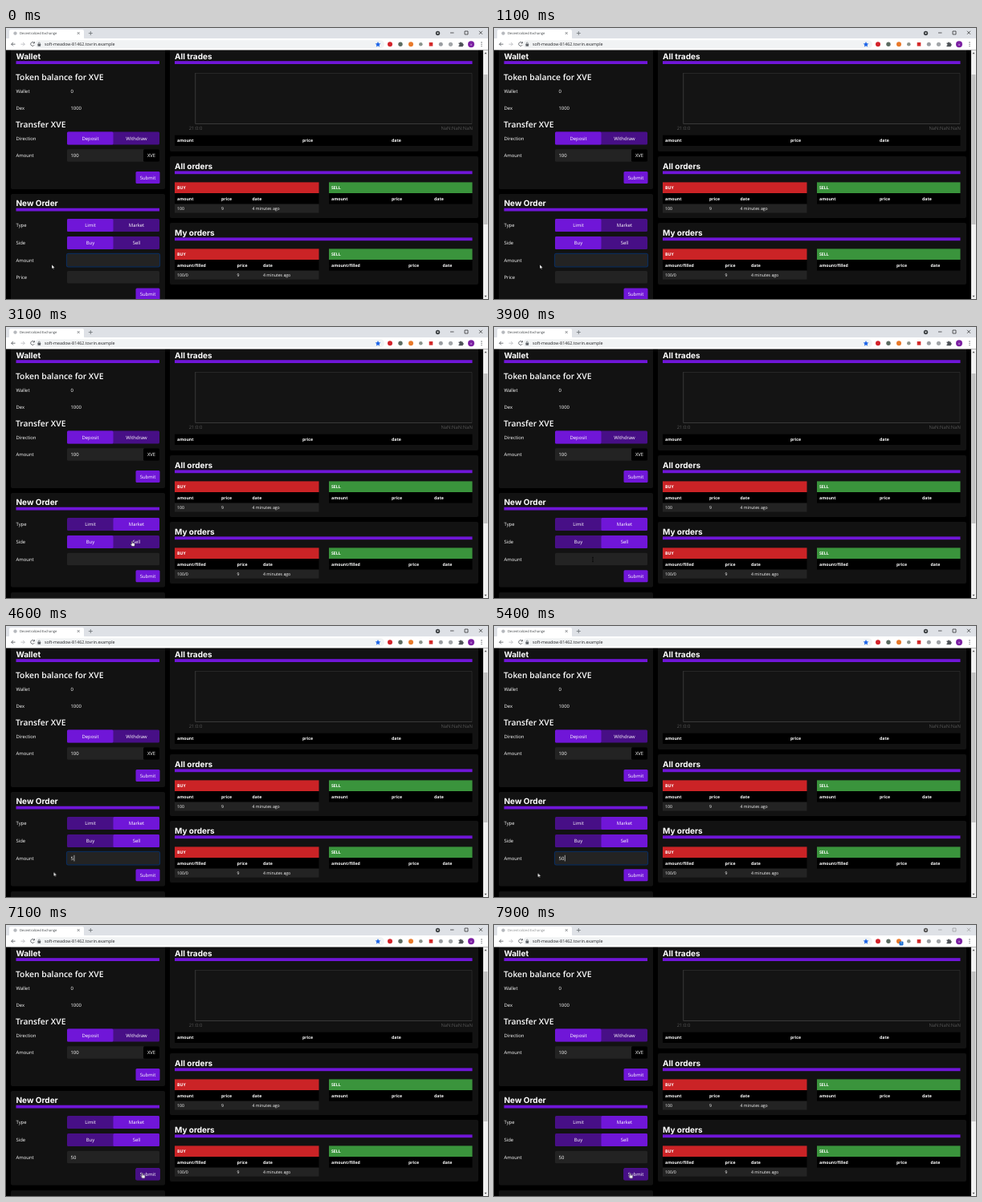
Animation of 600x338 px, one loop 8 s. Source, as an HTML page:

```html
<!DOCTYPE html>
<html lang="en">
<head>
<meta charset="utf-8">
<title>Decentralized Exchange</title>
<style>
html, body { margin: 0; width: 100%; height: 100%; overflow: hidden; background: #000; }
svg { display: block; width: 600px; height: 338px; }
text { font: 5.9px "Open Sans", "Noto Sans", sans-serif; fill: #fff; text-rendering: geometricPrecision; }
.head { font: 700 10px Inter, sans-serif; }
.sub { font-size: 10.3px; font-weight: 600; }
.cell { font-size: 5.2px; }
.bold { font-size: 5.2px; font-weight: 700; }
.axis { fill: #555; }
.tab { font-size: 4.2px; fill: #3c4043; }
.url { font-size: 5.3px; fill: #202124; }
.mid { text-anchor: middle; }
.end { text-anchor: end; }

.limit, .market, .buy, .sell, .focus, .caret1, .caret2, .five, .fifty,
.press, .active, .blur, .arrow, .hand, .beam { animation: 8s step-end infinite; }
.limit { animation-name: limit; }
.market { animation-name: market; }
.buy { animation-name: buy; }
.sell { animation-name: sell; }
.focus { animation-name: focus; }
.caret1 { animation-name: caret1; }
.caret2 { animation-name: caret2; }
.five { animation-name: five; }
.fifty { animation-name: fifty; }
.press { animation-name: press; }
.active { animation-name: active; }
.blur { animation-name: blur; }
.arrow { animation-name: arrow; }
.hand { animation-name: hand; }
.beam { animation-name: beam; }
.cursor { animation: move 8s ease-in-out infinite; }

@keyframes limit { 0% { opacity: 1 } 33.75%, to { opacity: 0 } }
@keyframes market { 0% { opacity: 0 } 33.75%, to { opacity: 1 } }
@keyframes buy { 0% { opacity: 1 } 41%, to { opacity: 0 } }
@keyframes sell { 0% { opacity: 0 } 41%, to { opacity: 1 } }
@keyframes focus { 0%, 50.6% { opacity: 1 } 33.75%, 77%, to { opacity: 0 } }
@keyframes caret1 { 0%, 13.25%, 26.5%, to { opacity: 0 } 6.63%, 19.88% { opacity: 1 } }
@keyframes caret2 { 0%, 68.2%, 77%, to { opacity: 0 } 50.6%, 74.8% { opacity: 1 } }
@keyframes five { 0%, to { opacity: 0 } 57.5% { opacity: 1 } }
@keyframes fifty { 0%, to { opacity: 0 } 61.25% { opacity: 1 } }
@keyframes press { 0%, to { opacity: 0 } 76% { opacity: 1 } }
@keyframes active { 0% { opacity: 1 } 90%, to { opacity: 0 } }
@keyframes blur { 0% { opacity: 0 } 90%, to { opacity: 1 } }
@keyframes arrow { 0%, 54% { opacity: 1 } 21.5%, 75.5%, to { opacity: 0 } }
@keyframes hand { 0%, 46% { opacity: 0 } 21.5%, 75.5%, to { opacity: 1 } }
@keyframes beam { 0%, 54%, to { opacity: 0 } 46% { opacity: 1 } }
@keyframes move {
  0%, 15.5% { transform: translate(57px, 295px) }
  26.5%, 35% { transform: translate(149px, 249px) }
  39%, 42% { transform: translate(157px, 267px) }
  48%, 51% { transform: translate(123px, 290px) }
  59%, 71.5% { transform: translate(54.5px, 308px) }
  76.5%, 84% { transform: translate(172.5px, 308px) }
  90%, to { transform: translate(169.5px, 309.5px) }
}
@keyframes caretShift {
  0% { transform: none }
  57.5% { transform: translate(3.4px, 0) }
  61.25%, to { transform: translate(6.8px, 0) }
}
.shift { animation: caretShift 8s step-end infinite; }
</style>
</head>
<body>
<svg id="stage" viewBox="0 0 600 338"></svg>
<script>
const PURPLE = '#7016d8', DARK = '#470f86', CARD = '#121212', FIELD = '#232323';

const box = (x, y, w, h, fill, r = 0, extra = '') =>
  `<rect x="${x}" y="${y}" width="${w}" height="${h}" rx="${r}" fill="${fill}" ${extra}/>`;
const text = (x, y, s, cls = '') => `<text x="${x}" y="${y}" class="${cls}">${s}</text>`;
const dot = (x, y, r, fill) => `<circle cx="${x}" cy="${y}" r="${r}" fill="${fill}"/>`;
const line = (d, stroke, w = 0.8) => `<path d="${d}" fill="none" stroke="${stroke}" stroke-width="${w}"/>`;
const group = (cls, ...parts) => `<g class="${cls}">${parts.join('')}</g>`;

const title = (x, y, w, s) => text(x, y, s, 'head') + box(x, y + 2.4, w, 3.8, PURPLE);
const field = (y, w = 115) => box(76, y, w, 15.5, FIELD, 1.5);
const submit = (y, fill = PURPLE) => box(161.5, y, 30, 15, fill, 1.5) + text(176.5, y + 9.9, 'Submit', 'mid');

// Two joined buttons; the chosen one is bright
function pair(y, left, right, first = true) {
  return box(76, y, 115, 16, DARK, 1.5) +
    box(first ? 76 : 133.5, y, 57.5, 16, PURPLE, 1.5) +
    text(105, y + 10.2, left, 'mid') + text(162.5, y + 10.2, right, 'mid');
}

function table(x, y, w, side, fill, cols, names, row) {
  const cells = (items, dy, cls) => items.map((s, i) => text(cols[i], y + dy, s, cls)).join('');
  return box(x, y, w, 13.6, fill) + text(x + 3, y + 8.7, side, 'bold') +
    box(x, y + 13.6, w, 13.6, '#000') + cells(names, 22.4, 'bold') +
    (row ? box(x, y + 27.2, w, 11, FIELD) + cells(row, 34.5, 'cell') : '');
}

function orders(y, name, amount, row, buyCols, sellCols) {
  const names = [amount, 'price', 'date'];
  return box(204, y, 384, 77, CARD, 2) + title(210, y + 16, 370.5, name) +
    table(210, y + 32.4, 179.5, 'BUY', '#cb2326', buyCols, names, row) +
    table(402, y + 32.4, 178.5, 'SELL', '#3a943c', sellCols, names);
}

function controls(color) {
  return line('M553 6h4.5M571 4h4v4h-4zM589 3.8l4 4m0-4l-4 4', color, 0.7);
}

function browser() {
  const star = 'M463 17l1 2.2 2.4.3-1.8 1.6.5 2.4-2.1-1.2-2.1 1.2.5-2.4-1.8-1.6 2.4-.3z';
  return box(0, 0, 600, 14, '#dee1e6') +
    '<path d="M2 14q2 0 2-2V4q0-2 2-2h89q2 0 2 2v8q0 2 2 2z" fill="#fff"/>' +
    box(0, 13, 600, 14.5, '#fff') + box(36, 15.3, 435, 10, '#f1f3f4', 5) +
    dot(11.5, 6.6, 2.2, '#b5b8bd') +
    group('active', text(17, 8.2, 'Decentralized Exchange', 'tab'), controls('#222'), dot(537.5, 6.5, 2.7, '#3c4043')) +
    group('blur', `<g opacity=".6">${text(17, 8.2, 'Decentralized Exchange', 'tab')}</g>`, controls('#999'), dot(537.5, 6.5, 2.7, '#555')) +
    '<path d="M536.2 5.8h2.6l-1.3 1.8z" fill="#fff"/>' +
    line('M88.7 5l3 3m0-3l-3 3M102.8 6.5h5M105.3 4v5', '#5f6368', 0.7) +
    line('M11.5 20.2H6.7m2.2-2.2l-2.2 2.2 2.2 2.2', '#4d5156') +
    line('M18.5 20.2h4.8m-2.2-2.2l2.2 2.2-2.2 2.2', '#b5b8bc') +
    line('M35 18.5a2.4 2.4 0 1 0 .3 2.5M35.4 17v2h-2', '#4d5156') +
    box(39.5, 19.8, 3.6, 3, '#5f6368', 0.4) + line('M40.3 20v-1a1 1 0 0 1 2 0v1', '#5f6368', 0.6) +
    text(48, 22.2, 'soft-meadow-81462.tovrin.example', 'url') +
    `<path d="${star}" fill="#1a63e8"/>` +
    dot(478, 20.3, 3, '#d3222a') + dot(491, 20.3, 2.7, '#5b6b60') + dot(504, 20.3, 3, '#e8792a') +
    dot(516.3, 20.3, 2.3, '#8b948c') + box(526.7, 18, 4.6, 4.6, '#d32a2a') +
    dot(541.3, 20.3, 2.5, '#9a9da1') + dot(553.5, 20.3, 2.6, '#a2a5a8') +
    '<path d="M563.5 18.4h1.6a1 1 0 0 1 2 0h1.7v1.6a1 1 0 0 1 0 2v1.2h-5.3v-1.4a1 1 0 0 0 0-2z" fill="#4d5156"/>' +
    dot(579, 20.3, 4, '#7b1fa2') + text(579, 22, 'v', 'tab mid" style="fill:#fff') +
    [18, 20.3, 22.6].map(y => dot(592, y, 0.65, '#4d5156')).join('') +
    group('blur', box(504.5, 20.6, 5, 4.8, '#1d6fd0', 1), text(507, 24.3, '1', 'tab mid" style="fill:#fff'));
}

function wallet() {
  return box(6, 24, 192, 177, CARD, 2) + title(12.5, 38.8, 178.5, 'Wallet') +
    text(12, 65.3, 'Token balance for XVE', 'sub') +
    text(12.5, 81, 'Wallet') + text(80.5, 81, '0') +
    text(12.5, 102.2, 'Dex') + text(80.5, 102.2, '1000') +
    text(12, 124, 'Transfer XVE', 'sub') +
    text(12.5, 139.6, 'Direction') + pair(129.5, 'Deposit', 'Withdraw') +
    text(12.5, 161.2, 'Amount') + field(151.3) + text(80.5, 161.2, '100') +
    box(171, 151.3, 20, 15.5, '#000', 1.5) + text(181, 161.2, 'XVE', 'mid') + submit(179);
}

function newOrder() {
  const card = h => box(6, 207, 192, h, CARD, 2);
  const caret = box(81, 285.8, 0.6, 7.6, '#fff');
  return group('limit', card(140)) +
    group('market', card(117.5), box(6, 331, 192, 20, CARD, 2)) +
    title(12.5, 222.3, 178.5, 'New Order') +
    text(12.5, 248.2, 'Type') +
    group('limit', pair(238, 'Limit', 'Market')) + group('market', pair(238, 'Limit', 'Market', false)) +
    text(12.5, 270, 'Side') +
    group('buy', pair(260, 'Buy', 'Sell')) + group('sell', pair(260, 'Buy', 'Sell', false)) +
    text(12.5, 291.8, 'Amount') + field(281.8) +
    group('focus', box(75.5, 281.3, 116, 16.5, 'none', 2, 'stroke="#0c2c58" stroke-width="1.2"')) +
    group('five', text(80.5, 291.8, '5')) + group('fifty', text(83.9, 291.8, '0')) +
    group('caret1', caret) + group('caret2', group('shift', caret)) +
    group('limit', text(12.5, 313, 'Price'), field(303), submit(324.5)) +
    group('market', submit(303.2)) + group('press', submit(303.2, DARK));
}

function trades() {
  return box(204, 24, 384, 130, CARD, 2) + title(210, 38.8, 370.5, 'All trades') +
    box(236, 56.5, 344, 63, '#141414') +
    line('M236 56.5H580V119.5', '#303030', 0.7) + line('M235.7 56V119.5H580', '#4a4a4a', 0.7) +
    text(236, 127, '21:0:0', 'axis mid') + text(581, 127, 'NaN:NaN:NaN', 'axis end') +
    box(210, 133.7, 370.5, 13.3, '#000') +
    text(213, 142.3, 'amount', 'bold') + text(369, 142.3, 'price', 'bold') + text(480, 142.3, 'date', 'bold');
}

function scrollbar() {
  return box(594, 27.5, 6, 311, '#f1f1f1') + box(594.6, 58, 4.8, 187, '#c1c1c1') +
    '<path d="M595.5 32.3l1.5-2 1.5 2zM595.5 333.8l1.5 2 1.5-2z" fill="#505050"/>';
}

function cursor() {
  const ink = 'fill="#fff" stroke="#000" stroke-width=".4"';
  return group('cursor',
    group('arrow', `<path d="M0 0v5.3l1.2-1 .8 1.8.9-.4-.8-1.7h1.6z" ${ink}/>`),
    group('hand', `<path d="M-.6.5q.6-1 1.2 0v2l2 .5q1 .3.8 1.3l-.5 2.2h-3l-2-2.4q0-.9.9-.5l.6.5z" ${ink}/>`),
    group('beam', line('M-1-2.7h2M0-2.7v5.4M-1 2.7h2', '#000', 0.6)));
}

document.getElementById('stage').innerHTML =
  box(0, 0, 600, 338, '#000') + wallet() + newOrder() + trades() +
  orders(160, 'All orders', 'amount', ['100', '9', '4 minutes ago'], [213, 268, 306.5], [405, 480, 533]) +
  orders(243, 'My orders', 'amount/filled', ['100/0', '9', '4 minutes ago'], [213, 287.5, 320], [405, 501, 543.5]) +
  browser() + scrollbar() + cursor();
</script>
</body>
</html>
```
